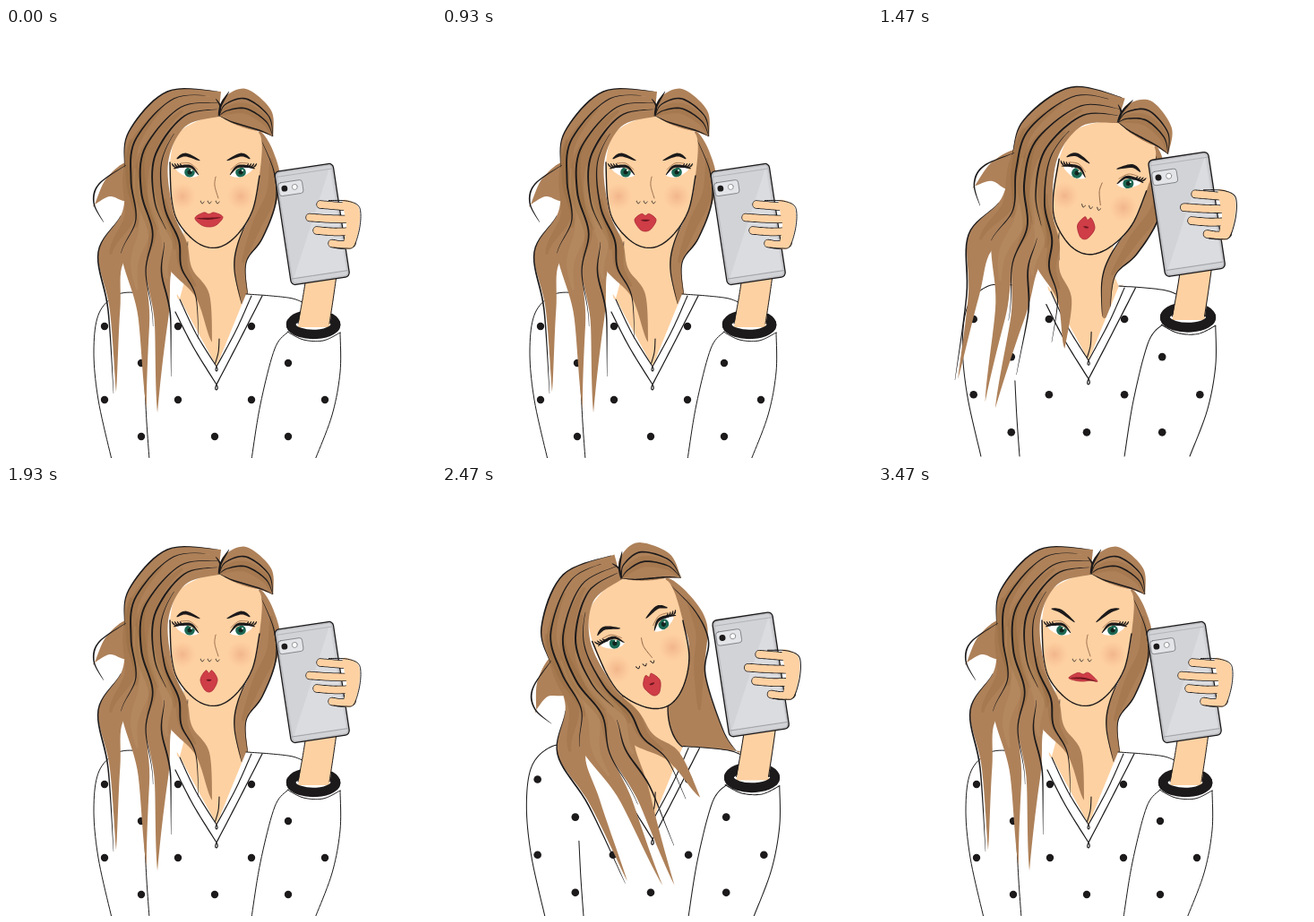
An HTML page with a canvas for the animation above (3.54 s loop, 480x480 px).

```html
<!DOCTYPE html>
<html lang="en">
<head>
<meta charset="utf-8">
<title>Selfie poses</title>
<style>
html, body { margin: 0; width: 100%; height: 100%; overflow: hidden; background: #fff; }
canvas { display: block; width: 480px; height: 480px; }
</style>
</head>
<body>
<canvas id="stage" width="480" height="480"></canvas>
<script>
const ctx = document.getElementById('stage').getContext('2d');
const { PI, sin, hypot, min, max } = Math;
const INK = '#1c1a1b', SKIN = '#fed1a2', HAIR = '#ae8159', SHADE = 'rgba(140,95,52,.24)', GLOW = 'rgba(205,165,122,.2)';
const LOOP = 3540;

// x, y: where the mouth sits; drop: vertical body shift; fall: how the hair beside the phone hangs.
const TUCKED = [286,235, 268,262, 270,300, 263,308, 255,270, 259,240];
const LOOSE = [284,229, 280,292, 285,318, 285,318, 233,294, 234,245];
const FRONT = { x: 226, y: 213, tilt: 0, scale: 1, drop: 0, fall: TUCKED };
const RIGHT = { x: 232.5, y: 218.5, tilt: 11.5, scale: 1.027, drop: -17, fall: TUCKED };
const LEFT = { x: 232.5, y: 217.5, tilt: -21.5, scale: 1.027, drop: -14.5, fall: LOOSE };

const PARTED = { x: 226.5, y: 212, w: 15.5, up: 6, low: 10, skew: -1, gap: .85 };
const POUT = { x: 227, y: 214, w: 12, up: 6.5, low: 13, skew: 0, gap: .4 };
const KISS = { x: 226.5, y: 216, w: 9.5, up: 10, low: 14, skew: 0, gap: .3 };
const SULK = { x: 229, y: 214, w: 16, up: 5.5, low: 4, skew: 4, gap: .9, cross: true };

const SCENES = [
  { until: 530, pose: FRONT, mood: PARTED },
  { until: 1000, pose: FRONT, mood: POUT },
  { until: 1530, pose: RIGHT, mood: KISS },
  { until: 2000, pose: FRONT, mood: KISS },
  { until: 2530, pose: LEFT, mood: KISS },
  { until: 3000, pose: FRONT, mood: PARTED },
  { until: LOOP, pose: FRONT, mood: SULK }
];

const lerp = (a, b, t) => a + (b - a) * t;

// Smooth path through x, y, x, y...; a doubled point makes a corner.
function spline(flat, closed) {
  const n = flat.length / 2, out = [];
  const at = i => {
    const k = closed ? (i + n) % n : max(0, min(n - 1, i));
    return [flat[2 * k], flat[2 * k + 1]];
  };
  for (let i = 0; i < (closed ? n : n - 1); i++) {
    const [a, b, c, d] = [at(i - 1), at(i), at(i + 1), at(i + 2)];
    for (let t = 0; t < .99; t += .1)
      out.push([0, 1].map(k => b[k] + .5 * t * (c[k] - a[k] +
        t * (2 * a[k] - 5 * b[k] + 4 * c[k] - d[k] + t * (3 * (b[k] - c[k]) + d[k] - a[k])))));
  }
  if (!closed) out.push(at(n - 1));
  return out;
}

function fill(points, color) {
  ctx.beginPath();
  points.forEach(p => ctx.lineTo(...p));
  ctx.closePath();
  ctx.fillStyle = color;
  ctx.fill();
}

function outline(color, width) {
  ctx.strokeStyle = color;
  ctx.lineWidth = width;
  ctx.stroke();
}

const blob = (flat, color) => fill(spline(flat, true), color);

function line(flat, width = 1, color = INK) {
  ctx.beginPath();
  spline(flat).forEach(p => ctx.lineTo(...p));
  outline(color, width);
}

// Brush stroke with thin ends.
function ribbon(p, width, color = INK) {
  const left = [], right = [], last = p.length - 1;
  p.forEach(([x, y], i) => {
    const a = p[max(0, i - 1)], b = p[min(last, i + 1)];
    const dx = b[0] - a[0], dy = b[1] - a[1];
    const r = width / 2 * (.2 + .8 * sin(PI * i / last)) / (hypot(dx, dy) || 1);
    left.push([x - dy * r, y + dx * r]);
    right.unshift([x + dy * r, y - dx * r]);
  });
  fill([...left, ...right], color);
}

const brush = (flat, width, color) => ribbon(spline(flat), width, color);

function disc(x, y, r, color) {
  ctx.beginPath();
  ctx.arc(x, y, r, 0, 2 * PI);
  ctx.fillStyle = color;
  ctx.fill();
}

function group(place, draw) {
  ctx.save();
  place();
  draw();
  ctx.restore();
}

// Hair grows between two guides: t = 0 is the outer edge, t = 1 the edge along the face.
const OUTER = spline([240,71, 180,71, 137,116, 132,160, 130,205, 103,250, 114,315, 120,408]);
const INNER = spline([237,99, 200,110, 181,150, 187,205, 202,240, 208,269, 229,297, 234,349]);
const END = OUTER.length - 1;

function hairPoint(t, i) {
  const s = i / END, middle = sin(PI * t);
  return [
    lerp(OUTER[i][0], INNER[i][0], t) + 6 * middle * sin(3.6 * PI * s),
    lerp(OUTER[i][1], INNER[i][1], t) + 50 * middle ** 3 * s ** 4
  ];
}

function strand(t, from = 0, to = 1) {
  const out = [];
  for (let i = Math.round(from * END); i <= to * END; i++) out.push(hairPoint(t, i));
  return out;
}

// A lock covers t0..t1 and narrows to its tip over the last part of its length.
function lock([t0, t1, tip]) {
  const edge = t => OUTER.map((_, i) => {
    const k = max(0, (i / END - .72) / .28) ** .8;
    return hairPoint(lerp(t, tip, k), i);
  });
  fill([...edge(t0), ...edge(t1).reverse()], HAIR);
}

function frontHair() {
  blob([136,150, 112,168, 99,197, 99,197, 116,188, 134,193, 142,178], HAIR);
  [[0, .24, .03], [.22, .47, .37], [.45, .74, .48], [.72, 1, .97]].forEach(lock);
  for (let k = 1; k < 9; k++) {
    const from = .12 + .3 * (k * .618 % 1);
    ribbon(strand(k / 9, from, from + .42), 13, k % 3 ? SHADE : GLOW);
  }

  ribbon(strand(0, .02, .42), 1.7);
  ribbon(strand(0, .58, 1), 1.7);
  ribbon(strand(.2, .06, .7), 1.9);
  ribbon(strand(.45, .02, .86), 2);
  ribbon(strand(.7, .02, .55), 2);
  ribbon(strand(.62, .6, .96), 1.8);
  ribbon(strand(.86, .2, .97), 2);
  brush([134,153, 104,174, 98,195, 109,217], 1.7);
  fringe();
}

function fringe() {
  const top = spline([238,98, 243,78, 268,68, 296,92, 298,121]);
  const low = spline([238,98, 252,106, 268,112, 284,116, 298,121]);
  fill([...top, ...[...low].reverse()], HAIR);
  const between = t => top.map((p, i) => p.map((v, k) => lerp(v, low[i][k], t)));
  ribbon(between(.5), 12, SHADE);
  for (const t of [.25, .5, .95]) ribbon(between(t), 1.7);
  brush([237,99, 240,86, 249,71], 2.4);
  brush([234,79, 239,87, 238,99], 1.8);
}

function sideHair(fall) {
  blob([282,116, 298,137, 306,178, ...fall, 276,200, 282,160], HAIR);
  brush([296,145, 296,185, 280,220, 264,262], 12, SHADE);
  brush([284,123, 299,160, 301,195, ...fall.slice(0, 6)], 1.6);
  brush([...fall.slice(6, 8), ...fall.slice(8), 276,200], 1.4);
}

function eye(side) {
  const cx = side < 0 ? 204 : 261;
  const mirror = flat => flat.map((v, i) => i % 2 ? 161 + v : cx - side * v);
  const iris = side < 0 ? 205 : 262;
  ctx.save();
  blob(mirror([-14,-3, -3,-6, 11,3, -1,5.5]), '#fff');
  ctx.clip();
  disc(iris, 161, 5.8, '#1c6954');
  disc(iris, 161, 2.5, '#12251f');
  disc(iris + 2, 159, 1, '#fff');
  ctx.restore();
  brush(mirror([-17,-4, -8,-6.5, 3,-6, 11,3]), 3.2);
  for (let i = 0; i < 4; i++)
    brush(mirror([-14 + i * 3,-5, -17 + i * 3,-7, -19 + i * 3,-10]), 1.6);
  line(mirror([-9,-10, 1,-10, 10,-3]), .7, '#8a5d3c');
}

function brow(side, cross) {
  const shape = cross ? [-38,137, -27,140, -12,152] : [-41,146, -31,141.5, -15,148];
  brush(shape.map((v, i) => i % 2 ? v : 231.5 - side * v), 3.8);
}

function blush(x) {
  const g = ctx.createRadialGradient(x, 188, 1, x, 188, 15);
  g.addColorStop(0, 'rgba(225,145,108,.4)');
  g.addColorStop(1, 'rgba(235,160,120,0)');
  disc(x, 188, 15, g);
}

function lips({ x, y, w, up, low, skew, gap }) {
  const place = flat => flat.map((v, i) => i % 2 ? y + v : x + v * w);
  blob(place([-1,0, -.38,-up, 0,-up * .72, .38,-up, 1,skew, .55,low * .78, 0,low, -.55,low * .78]), '#cf3d47');
  outline('#a72a35', .8);
  brush(place([-gap,.5, 0,.8, gap,.5 + skew * gap]), 2.2, '#6c1720');
}

function face(mood) {
  const jaw = [183,150, 185,192, 193,218, 214,240, 236,245, 257,232, 275,204, 283,165];
  blob([...jaw, 284,120, 260,108, 237,97, 195,115], SKIN);
  [197, 262].forEach(blush);
  for (const side of [-1, 1]) {
    eye(side);
    brow(side, mood.cross);
  }
  line([234,166, 233,176, 237,190], .8, '#86583c');
  for (const x of [219, 227, 236]) line([x - 2,193, x,196, x + 2,194], .9);
  lips(mood);
  line(jaw, 1.4);
}

function neck() {
  blob([202,215, 203,262, 194,302, 194,302, 235,381, 235,381, 269,300, 269,300, 260,272, 262,220], SKIN);
  brush([203,238, 202,255, 203,269], 1.6);
  line([238,347, 237,362, 233,376], 1.1);
}

function shirt() {
  const sleeve = [155,296, 126,297, 104,318, 98,360, 103,415, 118,482];
  const shoulder = [335,308, 320,302, 296,299, 268,297];
  const cuffSide = [373,340, 373,384, 364,432, 345,482];
  fill([...spline(sleeve), ...spline(cuffSide).reverse(), ...spline(shoulder), [235, 378], [194, 303]], '#fff');

  for (let row = 0; row < 4; row++)
    for (let k = row % 2 ? -2 : -3; k <= 3; k += 2) {
      const hidden = row === 0 && k === 3 || row === 1 && k === 0;
      if (!hidden) disc(233 + 41 * k, 333 + 41 * row, 4.2, INK);
    }

  fill([[194, 303], [235, 378], [274, 299], [286, 299], [235, 398], [189, 317]], '#fff');
  line([194,303, 212,341, 235,378, 235,378, 257,337, 274,299], 1.1);
  line([189,317, 209,356, 235,398, 235,398, 262,346, 286,299], 1.2);
  [sleeve, shoulder, cuffSide].forEach(edge => line(edge));
  line([155,400, 157,440, 160,482]);
  line([315,339, 300,358, 284,420, 274,482]);
  line([314,339, 332,348, 354,349, 373,340]);
}

function phone() {
  ctx.translate(341.7, 219);
  ctx.rotate(-8.6 * PI / 180);
  const box = (x, y, w, h, r, color) => {
    ctx.beginPath();
    ctx.roundRect(x, y, w, h, r);
    ctx.fillStyle = color;
    ctx.fill();
  };
  box(-33, -64, 66, 128, 5, '#bcbdc1');
  outline(INK, 1.3);
  box(-30.5, -62, 61.5, 124, 4, '#d2d3d7');
  fill([[29, -60], [30, 56], [-29, 56]], '#dbdcdf');
  line([-31,57, 31,57], .8, '#98999d');
  line([-31,-58, 31,-58], .7, '#a8a9ad');
  box(-31, -51, 27, 15, 3, '#e3e4e7');
  outline('#77787c', .8);
  disc(-24.5, -44, 3.4, INK);
  disc(-13, -44, 3, '#fff');
  outline('#77787c', .7);
}

function hand() {
  [351, 339, 347, 364].forEach((tip, i) => {
    const y = 197 + 14.5 * i, finger = [tip,y, lerp(tip, 386, .5),y + 1.5, 386,y + 3 - i];
    line(finger, 9.4);
    line(finger, 7.8, SKIN);
  });
  blob([376,193, 391,197, 395,208, 393,228, 387,245, 377,244, 380,220], SKIN);
  line([360,192.5, 380,193, 393,198, 396,209, 394,227, 388,244, 379,246, 366,245]);
}

function bracelet(from, to) {
  ctx.beginPath();
  ctx.ellipse(343, 331, 25, 11, 0, from, to);
  outline(INK, 10.5);
}

function arm() {
  bracelet(.9 * PI, 2.1 * PI);
  fill([[336, 270], [326, 334], [361, 334], [370, 270]], SKIN);
  line([335,278, 331,303, 326,330]);
  line([369,276, 365,304, 361,330]);
  bracelet(-.15, PI + .15);
  group(() => {}, phone);
  hand();
}

function render(time) {
  const { pose, mood } = SCENES.find(s => time < s.until);
  const body = () => {
    ctx.translate(233 * (1 - pose.scale), pose.drop);
    ctx.scale(pose.scale, pose.scale);
  };
  const head = () => {
    ctx.translate(pose.x, pose.y);
    ctx.rotate(pose.tilt * PI / 180);
    ctx.scale(pose.scale, pose.scale);
    ctx.translate(-226, -213);
  };
  ctx.fillStyle = '#fff';
  ctx.fillRect(0, 0, 480, 480);
  ctx.lineCap = ctx.lineJoin = 'round';
  group(body, neck);
  group(head, () => sideHair(pose.fall));
  group(body, shirt);
  group(head, () => {
    face(mood);
    frontHair();
  });
  group(body, arm);
}

let start;
function tick(now) {
  start ??= now;
  render(max(0, now - start) % LOOP);
  requestAnimationFrame(tick);
}
render(0);
requestAnimationFrame(tick);
</script>
</body>
</html>
```
